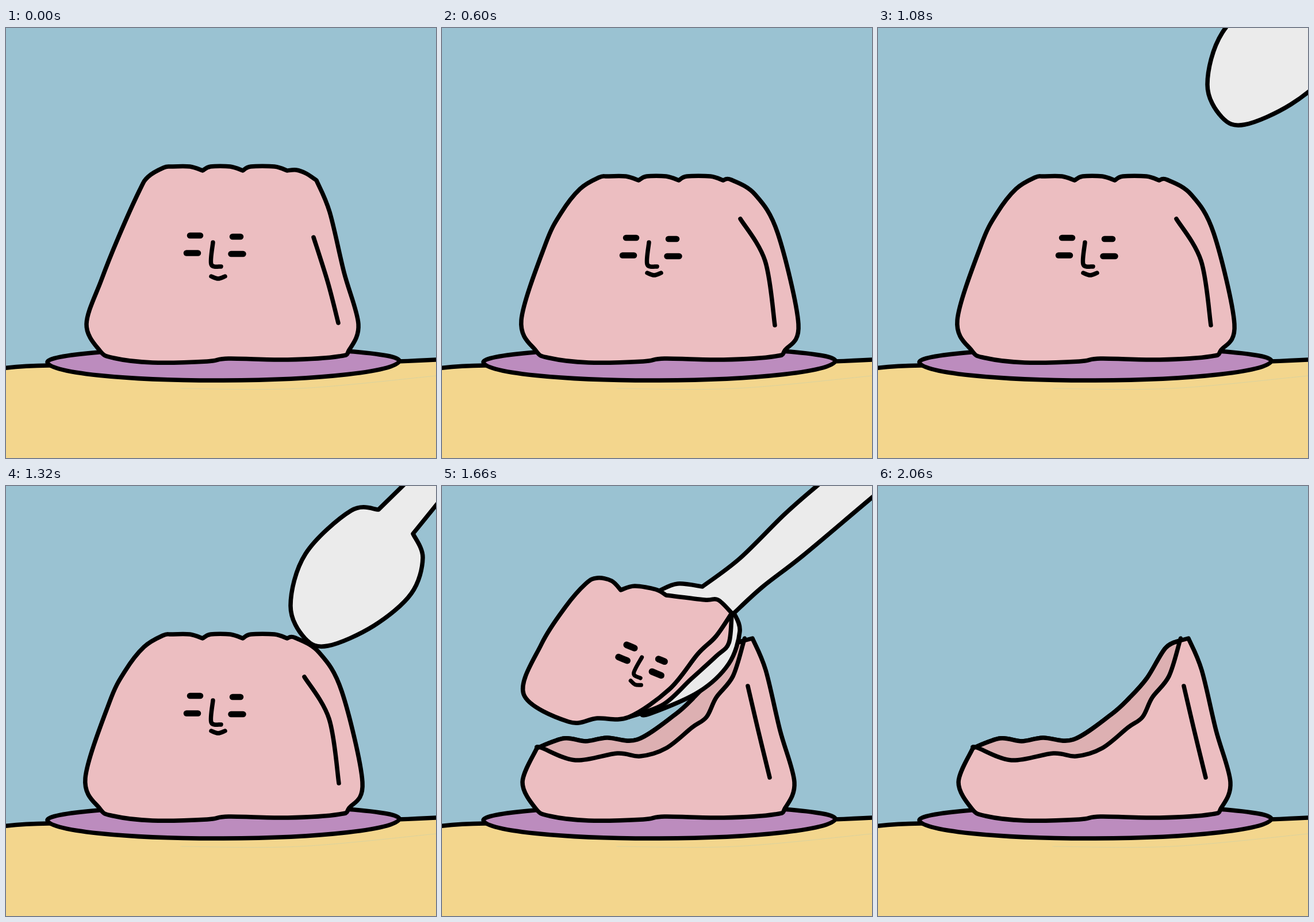
These frames come from a looping animation (748x748 px, 4.56 s). An HTML page with a canvas:

```html
<!DOCTYPE html>
<html lang="en">
<head>
<meta charset="utf-8">
<title>Pudding</title>
<style>
  html, body { margin: 0; height: 100%; overflow: hidden; background: #9ac2d2; }
  canvas { display: block; width: 100%; height: 100%; }
</style>
</head>
<body>
<canvas id="stage" width="748" height="748"></canvas>
<script>
const ctx = document.getElementById('stage').getContext('2d');
const SKY = '#9ac2d2', TABLE = '#f3d68d', PLATE = '#bc8cbe';
const PINK = '#ecbec1', CUT = '#ddb0b2', METAL = '#ebebeb', INK = '#000';

// A trailing * marks a sharp corner; it doubles the point.
const parse = text => text.trim().split(/\s+/).flatMap(word => {
  const point = word.replace('*', '').split(',').map(Number);
  return word.endsWith('*') ? [point, point] : [point];
});

// Smooth curve through a few key points.
function curve(text, closed = false) {
  const pts = parse(text), n = pts.length, path = new Path2D();
  const at = i => closed ? pts[(i + n) % n] : pts[Math.max(0, Math.min(n - 1, i))];
  path.moveTo(...pts[0]);
  for (let i = 0; i < (closed ? n : n - 1); i++) {
    const a = at(i - 1), b = at(i), c = at(i + 1), d = at(i + 2);
    if (b[0] === c[0] && b[1] === c[1]) continue;
    path.bezierCurveTo(
      b[0] + (c[0] - a[0]) / 6, b[1] + (c[1] - a[1]) / 6,
      c[0] - (d[0] - b[0]) / 6, c[1] - (d[1] - b[1]) / 6, ...c);
  }
  if (closed) path.closePath();
  return path;
}
const shape = text => curve(text, true);
const reverse = text => text.split(' ').reverse().join(' ');

function line(path, width = 7.5, color = INK) {
  ctx.lineWidth = width;
  ctx.strokeStyle = color;
  ctx.stroke(path);
}
function blob(path, color) {
  ctx.fillStyle = color;
  ctx.fill(path);
  line(path);
}

// Moves, turns and scales a drawing about a pivot.
function placed({ x = 0, y = 0, turn = 0, scale = 1, pivot = [0, 0] }, draw) {
  ctx.save();
  ctx.translate(pivot[0] + x, pivot[1] + y);
  ctx.rotate(turn * Math.PI / 180);
  ctx.scale(scale, scale);
  ctx.translate(-pivot[0], -pivot[1]);
  draw();
  ctx.restore();
}

// Scene
const table = shape('-30,595* 74,587 375,590 680,580 780,575* 780,780* -30,780*');
const grain = curve('304,627 510,627 748,605');
const plate = new Path2D();
plate.ellipse(378, 580, 306, 24, -0.004, Math.PI, 2 * Math.PI);
plate.ellipse(378, 580, 306, 33, -0.004, 0, Math.PI);

function scene() {
  ctx.fillStyle = SKY;
  ctx.fillRect(0, 0, 748, 748);
  blob(table, TABLE);
  line(grain, 0.7, '#cdd0a6');
  blob(plate, PLATE);
}

// Face: both poses and the cut slice share it
const dash = (x, y, length) => curve(`${x - length / 2},${y} ${x + length / 2},${y}`);
const eyes = [dash(329, 361, 18), dash(401, 363, 14), dash(324, 391.5, 20), dash(402, 393, 21)];
const nose = curve('360,373 357,411 374,415');
const mouth = curve('357,432 369,436 381,432');

function face(eyeDrop, mouthDrop, eyeWidth = 10.5, width = 7.5) {
  placed({ y: eyeDrop }, () => eyes.forEach(path => line(path, eyeWidth)));
  line(nose, width);
  placed({ y: mouthDrop }, () => line(mouth, width));
}

// Pudding outlines, clockwise from the lower right
const base = '597,560 580,571 490,577 387,575 350,580 255,582 187,574 163,561 ';
const rightSide = ' 540,265* 563,320 588,425 613,515';

// Three scallops with sharp notches between them
const crown = y => [[274, 342], [342, 412], [412, 489]].map(([from, to]) =>
  `${from + 14},${y} ${to - 22},${y} ${to},${y + 7}*`).join(' ');

const tall = {
  body: shape(base + '140,515 166,438 196,363 232,283 247,259 274,243 ' + crown(241) + ' 505,247 522,253' + rightSide),
  shine: curve('535,364 560,443 578,513'),
  face: [0, 0]
};
const squat = {
  body: shape(base + '138,508 180,376 207,322 240,280 273,260 ' + crown(258) + ' 503,264 545,290 584,357 620,515'),
  shine: curve('519,332 562,405 579,517'),
  face: [4, -6]
};

function pudding(pose) {
  blob(pose.body, PINK);
  line(pose.shine);
  face(...pose.face);
}

// What stays on the plate
const backRim = '165,456* 212,439 250,444 287,438 340,441 405,398 437,369 468,334 500,282 525,269*';
const frontRim = '172,455 232,477 305,465 345,470 390,456 435,420 460,402 477,368 506,331 525,270';
const rest = shape(base + '140,515 ' + backRim + rightSide);
const hollow = shape(backRim + ' ' + reverse(frontRim));
const restShine = curve('532,348 550,425 570,507');

function leftover() {
  blob(rest, PINK);
  blob(hollow, CUT);
  line(restShine);
}

// Empty spoon
const emptySpoon = shape(`648,41* 600,43 521,118 495,208 520,265 560,278 640,243 705,187 725,125
  708,83* 840,-80* 790,-98*`);
const spoon = (x, y) => placed({ x, y }, () => blob(emptySpoon, METAL));

// Loaded spoon
const handle = '508,221* 557,176 628,121 748,20 880,-90* 760,-90* 652,0 595,50 518,126 453,175* ';
const loadedSpoon = shape(handle + '410,170 378,182* 345,396* 362,396 447,358 499,309 518,253');
const sliceEdge = '504,221* 476,262 445,292 396,353 325,402';
const sliceSide = shape(sliceEdge + '* 385,380 433,336 477,296 499,273');
const slice = shape(sliceEdge + ` 270,404 220,410 142,362 173,275 215,210 250,170 270,160 295,165
  311,181* 335,174 372,180 390,190* 457,198 480,198`);
const sliceFace = { x: -9, y: -91, turn: 22.4, scale: 0.82, pivot: [323, 391] };

// Lifts the slice along a straight path while it tips back.
function scoop(progress) {
  const place = { x: -84 * progress, y: -72 * progress, turn: 10 * progress, pivot: [504, 221] };
  placed(place, () => {
    blob(loadedSpoon, METAL);
    blob(sliceSide, PINK);
    blob(slice, PINK);
    placed(sliceFace, () => face(0, -4, 14, 8.5));
  });
}

// Timeline: [duration in ms, drawing]
const wobbles = Array.from({ length: 12 }, (_, i) => [120, () => {
  pudding(i % 2 ? squat : tall);
  const stepsAway = 11 - i;
  if (stepsAway < 4) spoon(39 * stepsAway, -55 * stepsAway);
}]);
const dig = [120, () => { spoon(-45, 85); pudding(tall); }];
const lifts = [-0.4, 0, 0.6, 1, 1.9].map(progress => [100, () => { leftover(); scoop(progress); }]);
const timeline = [...wobbles, dig, ...lifts, [2500, leftover]];
const total = timeline.reduce((sum, [duration]) => sum + duration, 0);

ctx.lineCap = ctx.lineJoin = 'round';
const start = performance.now();

function tick() {
  let time = (performance.now() - start) % total, index = 0;
  while (time >= timeline[index][0]) time -= timeline[index++][0];
  scene();
  timeline[index][1]();
  requestAnimationFrame(tick);
}
tick();
</script>
</body>
</html>
```
